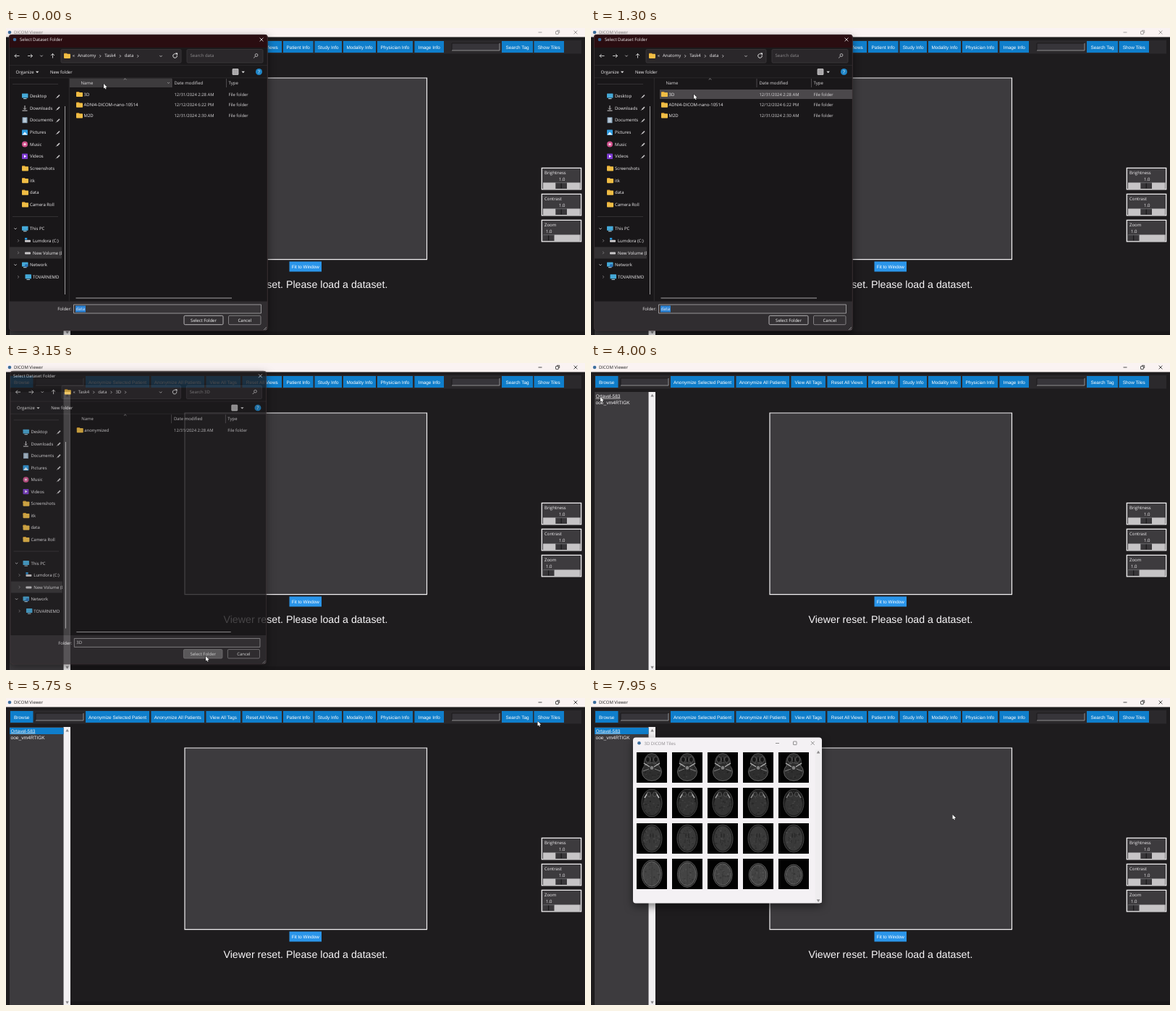
An HTML page with a canvas that plays this animation: 800 by 424 pixels, repeating every 8 s.

```html
<!DOCTYPE html>
<html lang="en">
<head>
<meta charset="utf-8">
<title>DICOM Viewer</title>
<style>
html, body { margin: 0; width: 100%; height: 100%; overflow: hidden; background: #1e1c1e; }
canvas { display: block; width: 800px; height: 424px; }
</style>
</head>
<body>
<canvas id="stage" width="800" height="424"></canvas>
<script>
const ctx = document.getElementById('stage').getContext('2d');
ctx.textRendering = 'geometricPrecision';
const LOOP = 8000;
const UI = '"Open Sans", sans-serif';
const TK = '"Liberation Sans", Arial, sans-serif';
const BLUE = '#0f7ecb', PANEL = '#3d3b3e', FOLDER = '#f0bd45';

// Times of the hard changes, in ms
const PICK = 1450, ENTER = 1650, CLOSE = 3100, LOADED = 3300, SELECT = 4400, TILES = 6600;
const FADE = 150;

const cursorPath = [
  [0, 135, 77], [600, 135, 77], [1200, 142, 91.5], [1900, 142, 91.5],
  [2600, 276, 405], [3300, 276, 405], [3950, 13, 47], [4600, 13, 47],
  [5700, 734.5, 32], [6000, 734.5, 32], [6300, 747, 29], [6950, 747, 29],
  [7950, 499.5, 161], [8000, 499.5, 161]
];

const clamp = u => Math.max(0, Math.min(1, u));
const smooth = u => u * u * (3 - 2 * u);

function cursorAt(t) {
  const i = cursorPath.findIndex(k => k[0] > t);
  const [t0, x0, y0] = cursorPath[i - 1], [t1, x1, y1] = cursorPath[i];
  const u = smooth((t - t0) / (t1 - t0));
  return { x: x0 + (x1 - x0) * u, y: y0 + (y1 - y0) * u };
}

// Drawing helpers
function rect(x, y, w, h, fill) {
  ctx.fillStyle = fill;
  ctx.fillRect(x, y, w, h);
}
function box(x, y, w, h, r, fill, stroke, width = 1) {
  ctx.beginPath();
  ctx.roundRect(x, y, w, h, r);
  if (fill) { ctx.fillStyle = fill; ctx.fill(); }
  if (stroke) { ctx.strokeStyle = stroke; ctx.lineWidth = width; ctx.stroke(); }
}
function line(points, color, width = 0.8) {
  ctx.beginPath();
  for (let i = 0; i < points.length; i += 2) ctx.lineTo(points[i], points[i + 1]);
  ctx.strokeStyle = color;
  ctx.lineWidth = width;
  ctx.stroke();
}
function shape(points, color) {
  ctx.beginPath();
  for (let i = 0; i < points.length; i += 2) ctx.lineTo(points[i], points[i + 1]);
  ctx.fillStyle = color;
  ctx.fill();
}
function oval(x, y, rx, ry, fill, stroke, width = 1) {
  ctx.beginPath();
  ctx.ellipse(x, y, rx, ry, 0, 0, Math.PI * 2);
  if (fill) { ctx.fillStyle = fill; ctx.fill(); }
  if (stroke) { ctx.strokeStyle = stroke; ctx.lineWidth = width; ctx.stroke(); }
}
// Text whose line is centred on y; returns its width
function text(str, x, y, color = '#f2f0f2', size = 6, family = UI, align = 'left') {
  ctx.font = `${size}px ${family}`;
  ctx.textAlign = align;
  ctx.fillStyle = color;
  ctx.fillText(str, x, y + size * 0.36);
  return ctx.measureText(str).width;
}
function chevron(x, y, dir, color = '#d8d6d8', s = 1.7) {
  const [dx, dy] = { right: [1, 0], down: [0, 1], up: [0, -1] }[dir];
  line([x - dx * s / 2 - dy * s, y - dy * s / 2 - dx * s, x + dx * s / 2, y + dy * s / 2,
        x - dx * s / 2 + dy * s, y - dy * s / 2 + dx * s], color);
}
function cross(x, y, s, color) {
  line([x - s, y - s, x + s, y + s], color);
  line([x - s, y + s, x + s, y - s], color);
}
function scaled(cx, cy, s, alpha, draw) {
  ctx.save();
  ctx.globalAlpha = alpha;
  ctx.translate(cx, cy);
  ctx.scale(s, s);
  ctx.translate(-cx, -cy);
  draw();
  ctx.restore();
}
function shadowBox(x, y, w, h, r, fill) {
  ctx.save();
  ctx.shadowColor = 'rgba(0,0,0,.5)';
  ctx.shadowBlur = 12;
  ctx.shadowOffsetY = 4;
  box(x, y, w, h, r, fill);
  ctx.restore();
}
function folderIcon(x, y) {
  box(x, y - 3.6, 4.5, 3, 0.8, '#d99a2b');
  box(x, y - 2.6, 9, 6.2, 0.8, FOLDER);
}

// Main window
const buttons = [
  ['Browse', 6, 37.5], ['Anonymize Selected Patient', 110, 198], ['Anonymize All Patients', 200.5, 274],
  ['View All Tags', 276.5, 324], ['Reset All Views', 326.5, 381], ['Patient Info', 383, 424.5],
  ['Study Info', 426.5, 464], ['Modality Info', 466, 511], ['Physician Info', 513, 562],
  ['Image Info', 564.5, 605], ['Search Tag', 685, 728], ['Show Tiles', 729.5, 771]
];

function entry(x) {
  rect(x, 21, 66, 10, '#37353a');
  line([x, 31, x, 21, x + 66, 21], '#1b191b', 1);
  line([x, 31, x + 66, 31, x + 66, 21], '#a8a6a8', 0.8);
}

function slider(label, y, valueX, knobX) {
  box(740.3, y + 0.3, 54.4, 29.6, 0, PANEL, '#f4f2f4', 1.3);
  text(label, 744, y + 6.5);
  text('1.0', valueX, y + 15.5);
  rect(742, y + 20.5, 51.5, 8.5, '#c6c4c6');
  rect(knobX, y + 20.5, 15.5, 8.5, '#39373a');
  line([knobX + 7.7, y + 21, knobX + 7.7, y + 28.5], '#121112', 1);
  line([knobX, y + 29, knobX, y + 21, knobX + 15.5, y + 21], '#5b595c', 0.7);
}

function mainWindow(t) {
  rect(0, 0, 800, 424, '#1e1c1e');
  const active = t >= CLOSE, ink = active ? '#222' : '#8c8888';
  rect(0, 0, 800, 12.5, '#faf3f2');
  oval(5, 6, 2.3, 2.3, '#3d6f9e');
  text('DICOM Viewer', 11, 6.3, ink);
  line([735.5, 6, 740.5, 6], ink);
  box(759.5, 4.5, 4, 4, 0.6, null, ink, 0.8);
  line([761, 3.3, 764.7, 3.3, 764.7, 7], ink, 0.7);
  cross(787, 6, 2.4, ink);

  rect(5, 17, 790, 18.5, '#2b292c');
  entry(41);
  entry(616);
  for (const [label, x0, x1] of buttons) {
    rect(x0, 18, x1 - x0, 16, BLUE);
    text(label, (x0 + x1) / 2, 26.2, '#fff', 6.4, TK, 'center');
  }

  rect(5, 40, 74.5, 384, PANEL);
  rect(79.5, 40, 9.5, 384, '#f2f0f2');
  shape([82.4, 46.5, 86.8, 46.5, 84.6, 42.8], '#8b898b');
  shape([82.4, 418.8, 86.8, 418.8, 84.6, 422.5], '#8b898b');
  rect(89, 419, 711, 5, '#191719');
  if (t >= LOADED) {
    if (t >= SELECT) rect(5, 41, 74.5, 9, BLUE);
    const w = text('Ortavel-583', 6.5, 45.7, '#f4f2f4', 6.5, TK);
    line([6.5, 49, 6.5 + w, 49], '#f4f2f4', 0.7);
    text('ooe_vm4RTIGK', 6.5, 54.7, '#f4f2f4', 6.6, TK);
  }

  box(247, 69, 334.5, 250.6, 0, PANEL, '#f4f2f4', 1.2);
  rect(391.5, 322.5, 44.5, 14, '#2a95ea');
  text('Fit to Window', 413.8, 329.7, '#fff', 6.3, TK, 'center');
  text('Viewer reset. Please load a dataset.', 300.5, 354.3, '#f8f6f8', 14.2, TK);
  slider('Brightness', 193, 764, 759.5);
  slider('Contrast', 229, 764, 759.5);
  slider('Zoom', 265, 746, 742);
}

// Folder dialog
const places = ['Desktop', 'Downloads', 'Documents', 'Pictures', 'Music', 'Videos',
  'Screenshots', 'itk', 'data', 'Camera Roll', '', 'This PC', 'Lumdora (C:)', 'New Volume (D:)',
  'Network', 'TOVARNEMD'];

function placeIcon(i, y) {
  if (i >= 6 && i <= 9) return folderIcon(22, y);
  if (i === 1) {
    line([26, y - 3.5, 26, y + 1.5], '#d4d2d4', 1);
    chevron(26, y + 1, 'down', '#d4d2d4', 2);
    line([22.5, y + 3.5, 29.5, y + 3.5], '#d4d2d4', 1);
  } else if (i === 2) {
    box(22.5, y - 4, 7, 8, 0.6, '#8fa9bf');
    for (const dy of [-2, 0, 2]) line([24, y + dy, 28, y + dy], '#fff', 0.7);
  } else if (i === 3) {
    box(22, y - 3.5, 8, 7.5, 0.8, '#2e9be0');
    shape([22.5, y + 3.5, 26, y - 0.5, 29.5, y + 3.5], '#e6f4ff');
  } else if (i === 4) {
    oval(26, y, 4, 4, '#d0508c');
    oval(26, y, 1.7, 1.7, '#f7d5e4');
  } else if (i === 5) {
    box(22, y - 3.7, 8, 7.5, 0.8, '#7d3bd0');
    shape([25, y - 2, 28, y, 25, y + 2], '#fff');
  } else if (i === 12 || i === 13) {
    box(26, y - 1, 8, 3, 0.8, '#c9c7c9');
    if (i === 12) rect(26, y - 4, 3.2, 2.6, '#2e9be0');
  } else {
    const x = i === 15 ? 26.5 : 22;
    box(x, y - 3.5, 8.5, 6, 0.6, '#45a9d8');
    line([x + 2, y + 3.6, x + 6.5, y + 3.6], '#b9d8e6', 1);
    if (i === 14) oval(x + 6, y + 1, 2.2, 2.2, '#2a6fb5');
  }
}

function sidePane() {
  line([9, 77.5, 72, 77.5], '#3a373a', 0.8);
  ctx.save();
  ctx.beginPath();
  ctx.rect(5, 80, 72, 295);
  ctx.clip();
  places.forEach((name, i) => {
    const y = 94 + 16.65 * i;
    if (!name) return line([9, y, 72, y], '#3a373a', 0.8);
    if (i === 13) rect(5, y - 8, 72, 16, '#333133');
    placeIcon(i, y);
    const nested = i === 12 || i === 13 || i === 15;
    text(name, nested ? 37 : 33, y);
    if (i < 6) {
      line([70.5, y + 2, 74, y - 1.5], '#c8c6c8', 1.6);
      line([69, y + 3.2, 71, y + 1.2], '#c8c6c8', 0.7);
    }
    if (i > 10) chevron(nested ? 17 : 13, y, nested ? 'right' : 'down', nested ? '#8d8b8d' : '#d8d6d8');
  });
  ctx.restore();
  line([81.5, 108, 81.5, 368], '#9a989a', 1);
}

function fileRow(y, [name, date], hover, picked) {
  if (hover || picked) rect(95, y - 6.5, 266, 13, picked ? '#5c595c' : '#4b484b');
  folderIcon(97, y);
  text(name, 107.5, y);
  text(date, 232.5, y, '#d6d4d6', 5.9);
  text('File folder', 307.5, y, '#d6d4d6', 5.9);
}

function dialog(t, cursor) {
  const inside = t >= ENTER, closing = t >= CLOSE;
  shadowBox(4, 9, 357.5, 409, 4, '#1b191b');
  // The title bar loses its tint and icon as the dialog closes
  box(4, 9, 357.5, 18, [4, 4, 0, 0], closing ? '#1f1d1f' : '#2a0d11');
  if (!closing) oval(12, 16, 2.3, 2.3, '#3d6f9e');
  text('Select Dataset Folder', closing ? 8.5 : 19, 16.3);
  cross(353, 16, 2.4, '#f0eef0');

  // Navigation bar
  line([18.5, 38.5, 12, 38.5], '#eee');
  line([14.5, 36, 12, 38.5, 14.5, 41], '#eee');
  line([30, 38.5, 36.5, 38.5], '#eee');
  line([34, 36, 36.5, 38.5, 34, 41], '#eee');
  chevron(49, 38.5, 'down');
  line([64.5, 41.5, 64.5, 35.5], '#eee');
  line([62, 38, 64.5, 35.5, 67, 38], '#eee');
  box(76, 29.5, 166, 18.5, 1.5, '#2a272a', '#3d3a3d', 0.8);
  folderIcon(80, 38.3);
  text('«', 92, 38);
  let x = 99;
  for (const crumb of inside ? ['Task4', 'data', '3D'] : ['Anatomy', 'Task4', 'data']) {
    x += text(crumb, x, 38.3);
    chevron(x + 6, 38.8, 'right');
    x += 12;
  }
  chevron(214, 38.8, 'down');
  ctx.beginPath();
  ctx.arc(233.5, 38.5, 2.8, -0.3, 5.2);
  ctx.strokeStyle = '#eee';
  ctx.lineWidth = 0.9;
  ctx.stroke();
  shape([233.8, 34.6, 237, 34.6, 237, 37.6], '#eee');
  box(250, 29.5, 105, 18.5, 1.5, '#2a272a', '#3d3a3d', 0.8);
  text(inside ? 'Search 3D' : 'Search data', 254.5, 38.3, '#8f8d8f');
  oval(346, 37.5, 1.9, 1.9, null, '#d0ced0', 0.8);
  line([344.6, 39, 342.2, 41.4], '#d0ced0', 0.9);

  // Command bar
  line([4, 51.5, 361, 51.5], '#2d2a2d');
  text('Organize', 13.5, 60.7);
  shape([41, 59.8, 45.4, 59.8, 43.2, 62.2], '#ddd');
  text('New folder', 61, 60.7);
  box(313, 56.5, 8, 8, 0.6, '#a9a7a9', '#dad8da', 0.7);
  shape([325.5, 59.8, 329.9, 59.8, 327.7, 62.2], '#ddd');
  oval(349.5, 60.5, 4.5, 4.5, '#1f86c8');
  text('?', 349.5, 60.6, '#fff', 6.5, UI, 'center');
  line([4, 69, 361, 69], '#343134');

  // File list
  rect(4.5, 69.5, 356.5, 308, '#191719');
  sidePane();
  line([87.3, 69, 87.3, 377], '#343134');
  const overList = cursor.x > 95 && cursor.x < 361;
  if (overList && cursor.y > 69 && cursor.y < 82) {
    rect(88, 69.5, 141, 12.5, '#3d3b3d');
    chevron(224.5, 75.8, 'down', '#aaa', 1.4);
  }
  chevron(164.5, 70.6, 'up', '#a8a6a8');
  text('Name', 103.5, 75.8, '#dcdadc');
  text('Date modified', 232.5, 75.8, '#dcdadc');
  text('Type', 307.5, 75.8, '#dcdadc');
  line([229, 70, 229, 82], '#5a575a');
  line([304.5, 70, 304.5, 82], '#5a575a');
  const rows = inside
    ? [['anonymized', '12/31/2024 2:28 AM']]
    : [['3D', '12/31/2024 2:28 AM'], ['ADNI4-DICOM-nano-10514', '12/12/2024 6:22 PM'],
       ['M2D', '12/31/2024 2:30 AM']];
  rows.forEach((row, i) => {
    const y = 91.5 + 14.7 * i;
    fileRow(y, row, overList && Math.abs(cursor.y - y) < 6.5, !inside && i === 0 && t >= PICK);
  });
  line([96.5, 373, 312, 373], '#a5a3a5', 1);

  // Footer
  box(4.5, 377.5, 356.5, 40, [0, 0, 4, 4], '#302d30');
  text('Folder:', 90.5, 388, '#f2f0f2', 6, UI, 'right');
  box(93.5, 382, 259, 12, 0, '#383538', '#a3a1a3', 0.9);
  if (t < PICK) rect(96, 383.5, 14, 9, '#2b83d6');
  text(t < PICK ? 'data' : '3D', 96.5, 387.8);
  const overSelect = cursor.x > 246 && cursor.x < 300 && cursor.y > 397 && cursor.y < 410;
  box(246, 397.3, 54, 12.4, 1.5, overSelect ? '#6a686a' : '#343134', overSelect ? '#858385' : '#c4c2c4', 0.9);
  text('Select Folder', 273, 403.5, '#fff', 6, UI, 'center');
  box(307.5, 397.3, 44.5, 12.4, 1.5, '#343134', '#8d8b8d', 0.9);
  text('Cancel', 329.8, 403.5, '#fff', 6, UI, 'center');
  line([356, 417, 360, 413], '#a09ea0', 0.8);
  line([358.3, 417, 360, 415.3], '#a09ea0', 0.8);
  box(4.3, 9.3, 357, 408.5, 4, null, '#4a3d40', 0.7);
}

// Scan tiles
function randomFrom(seed) {
  return () => (seed = (seed * 16807) % 2147483647) / 2147483647;
}
const gray = v => `rgb(${v},${v},${v})`;

function scan(k) {
  const rand = randomFrom(k * 977 + 31);
  const face = k < 5, eyes = k >= 5 && k < 10, top = k > 14;
  const shrink = Math.max(0, k - 15);
  const rx = 14 - shrink * 0.4, ry = 19 - shrink * 1.1, cy = 21 + shrink * 0.4;
  const base = face ? 46 : eyes ? 52 : top ? 68 : 58;
  rect(0, 0, 42, 42, '#020202');
  if (face) {
    oval(21, 14, 10.5, 12.5, '#2a2a2a', '#686868', 0.7);
    oval(21, 27, 13.5, 12.5, gray(base), '#707070', 0.8);
  } else {
    oval(21, cy, rx, ry, '#1c1c1c', gray(top ? 112 : 88), 0.8);
    oval(21, cy + (eyes ? 2.5 : 0), rx - 1.8, ry - (eyes ? 4.5 : 2), gray(base), top ? '#858585' : null, 0.6);
  }

  // Mottled tissue
  for (let i = 0; i < 50; i++) {
    const a = rand() * 6.283, r = Math.sqrt(rand()) * 0.82;
    oval(21 + Math.cos(a) * r * rx, cy + Math.sin(a) * r * ry, 0.5 + rand() * 1.1, 0.4 + rand() * 0.8,
      gray(Math.round(base - 18 + rand() * 36)));
  }
  for (const side of [-1, 1]) {
    if (face) {
      oval(21 + side * 5.5, 10, 3, 4, '#161616', '#777', 0.6);
      line([21 + side * 3, 20, 21 + side * 11, 15], '#b4b4b4', 1.3);
      line([21 + side * 4, 23, 21 + side * 12, 26], '#8a8a8a', 0.9);
    } else if (eyes) {
      line([21 + side * 5, 6, 21 + side * 10, 14], gray(195 - (k - 5) * 18), 1.5);
      oval(21 + side * 4, 9, 2.6, 3.2, '#2b2b2b', '#6c6c6c', 0.6);
    } else if (!top) {
      oval(21 + side * 1.8, 17, 0.9, 3.2, '#2a2a2a');
      oval(21 + side * 3, 25, 0.8, 2.8, '#303030');
    }
  }
  if (face) {
    oval(21, 10, 1.5, 4.5, '#0c0c0c', '#6c6c6c', 0.5);
    oval(21, 21.5, 2.4, 2.4, '#818181');
  } else if (!eyes) line([21, cy - ry + 3, 21, cy + ry - 3], '#363636', 0.6);
}

function tilesWindow() {
  shadowBox(58, 54.5, 261, 229, 4, '#f4f1f4');
  oval(66.5, 62.3, 2.3, 2.3, '#3d6f9e');
  text('3D DICOM Tiles', 73.5, 62.5, '#8d898d');
  line([255, 62.5, 260, 62.5], '#777');
  box(279.5, 60, 4.6, 4.6, 0.5, null, '#777', 0.8);
  cross(306.3, 62.3, 2.4, '#777');
  rect(309.5, 71, 9, 212, '#efedef');
  shape([311.8, 76.5, 316.4, 76.5, 314.1, 72.8], '#8b898b');
  shape([311.8, 278.3, 316.4, 278.3, 314.1, 282], '#8b898b');
  for (let k = 0; k < 20; k++) {
    ctx.save();
    ctx.translate(63 + 49 * (k % 5), 75 + 49 * Math.floor(k / 5));
    scan(k);
    ctx.restore();
  }
}

function drawCursor({ x, y }) {
  ctx.save();
  ctx.translate(x, y);
  ctx.beginPath();
  for (const [px, py] of [[0, 0], [0, 6.6], [1.5, 5.3], [2.5, 7.6], [3.6, 7.1], [2.6, 4.9], [4.7, 4.8]]) ctx.lineTo(px, py);
  ctx.closePath();
  ctx.strokeStyle = '#111';
  ctx.lineWidth = 0.9;
  ctx.stroke();
  ctx.fillStyle = '#fff';
  ctx.fill();
  ctx.restore();
}

// Fades a drawing as one layer so its parts do not show through each other
const behind = document.createElement('canvas');
behind.width = 800;
behind.height = 424;
function fadeLayer(alpha, draw) {
  behind.getContext('2d').drawImage(ctx.canvas, 0, 0);
  draw();
  ctx.save();
  ctx.resetTransform();
  ctx.globalAlpha = 1 - alpha;
  ctx.drawImage(behind, 0, 0);
  ctx.restore();
}

function render(t) {
  const cursor = cursorAt(t);
  mainWindow(t);
  const closing = clamp((t - CLOSE) / FADE);
  if (closing === 0) {
    dialog(t, cursor);
  } else if (closing < 1) {
    fadeLayer(1 - closing ** 1.5, () =>
      scaled(182.7, 213.5, 1 - 0.08 * closing ** 2, 1, () => dialog(t, cursor)));
  }
  if (t >= TILES) {
    const u = clamp((t - TILES) / FADE);
    const ease = 1 - (1 - u) ** 2;
    scaled(138, 129, 0.925 + 0.075 * ease, clamp(u * 3), tilesWindow);
  }
  drawCursor(cursor);
}

const start = performance.now();
function frame() {
  render((performance.now() - start) % LOOP);
  requestAnimationFrame(frame);
}
frame();
</script>
</body>
</html>
```
